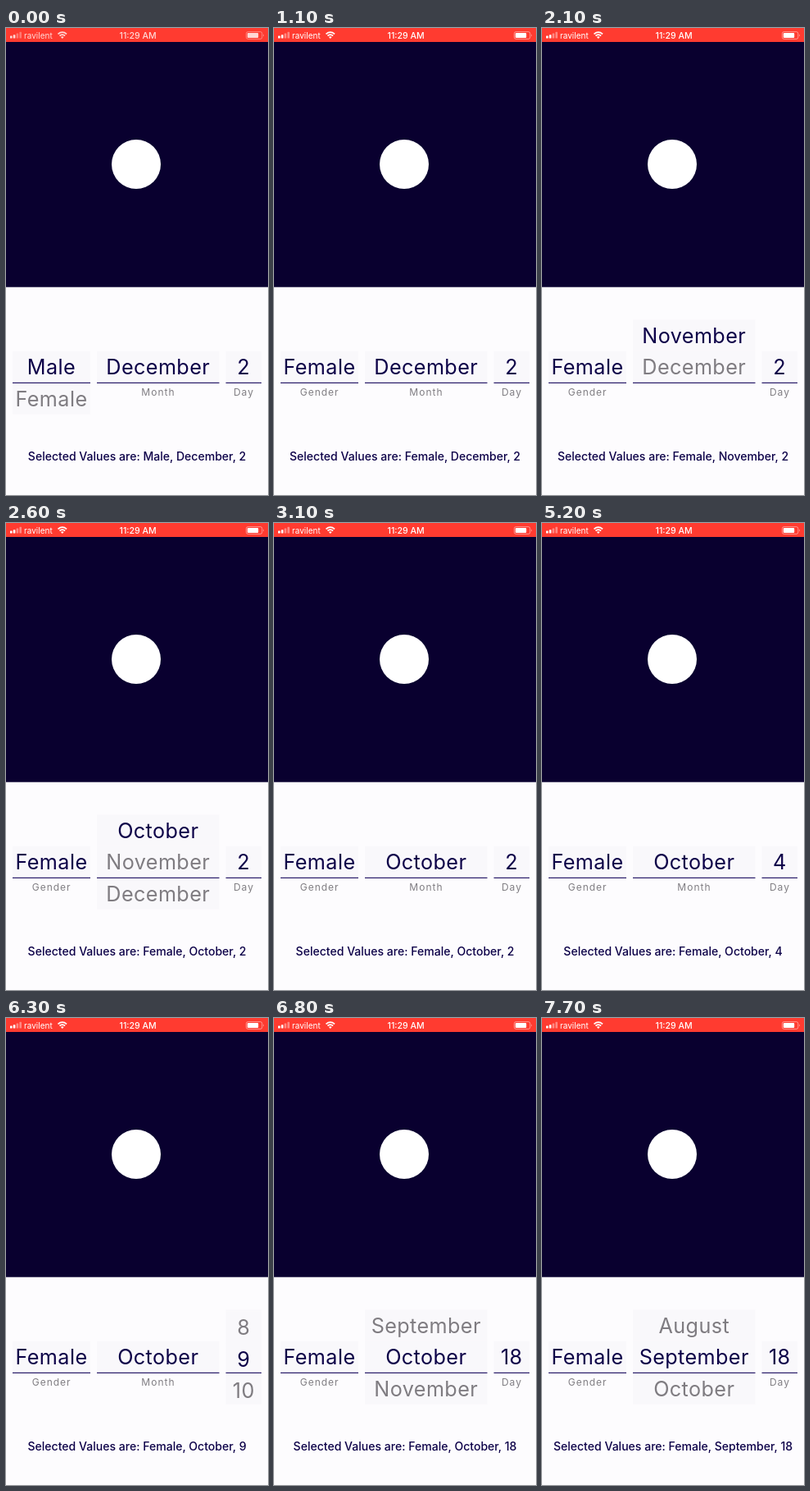
These frames come from a looping animation (320x569 px, 8 s). An HTML page:

```html
<!DOCTYPE html>
<html lang="en">
<head>
<meta charset="utf-8">
<title>Picker fields</title>
<style>
  html, body { margin: 0; width: 100%; height: 100%; overflow: hidden; background: #fdfcfe; }
  svg { display: block; width: 320px; height: 569px; font-family: Inter, "Open Sans", sans-serif; }
  text { text-anchor: middle; }
  .item { font-size: 25.2px; letter-spacing: .4px; fill: #7f7c81; }
  .item.on { fill: #0c0048; }
  .label { font-size: 12px; letter-spacing: 1px; fill: #807e83; }
  #summary { font-size: 14.06px; font-weight: 450; fill: #0c0048; }
  #status { fill: #fff; font-size: 10.6px; }
</style>
</head>
<body>
<svg viewBox="0 0 320 569">
  <defs>
    <clipPath id="open"><rect y="355.5" width="320" height="115"/></clipPath>
    <clipPath id="closed"><rect y="393.5" width="320" height="39"/></clipPath>
  </defs>
  <rect width="320" height="569" fill="#fdfcfe"/>
  <rect y="17" width="320" height="298.7" fill="#09002f"/>
  <circle cx="159" cy="166" r="30" fill="#fff"/>
  <rect width="320" height="17" fill="#ff3b30"/>
  <g id="status">
    <rect x="5" y="9.5" width="2.6" height="3" rx=".6"/>
    <rect x="8.8" y="8.2" width="2.6" height="4.3" rx=".6"/>
    <g opacity=".4">
      <rect x="12.6" y="6.6" width="2.6" height="5.9" rx=".6"/>
      <rect x="16.4" y="4.8" width="2.6" height="7.7" rx=".6"/>
    </g>
    <text x="22" y="12.5" style="text-anchor:start;font-size:10px">ravilent</text>
    <path d="M63.5 7.4q5.3-4.4 10.6 0M65.5 9.5q3.3-2.7 6.6 0" fill="none" stroke="#fff" stroke-width="1.7"/>
    <path d="M66.9 10.9q1.9-1.5 3.8 0l-1.9 2z"/>
    <text x="161.2" y="12.6" font-weight="500">11:29 AM</text>
    <rect x="293.4" y="4.6" width="19.4" height="8.8" rx="2.2" fill="none" stroke="#fff" stroke-opacity=".5" stroke-width=".9"/>
    <rect x="294.8" y="6" width="13.4" height="6" rx="1"/>
    <path d="M314 7.4q1.6 1.6 0 3.2z" opacity=".6"/>
  </g>
  <g id="fields"></g>
  <text id="summary" x="160" y="527"></text>
</svg>
<script>
const LOOP = 8000, STEP = 100, ROW = 38.6, TOP = 393.6;
const months = "January February March April May June July August September October November December".split(" ");
const days = Array.from({ length: 31 }, (_, i) => i + 1);

// open: [from, to] times; moves: [start, duration, target index]
// eager fields mark the new value as soon as a move begins
const fields = [
  { label: "Gender", x: 8, w: 95, items: ["Male", "Female"], start: 0, eager: true,
    open: [[0, 1100]], moves: [[500, 300, 1]] },
  { label: "Month", x: 111, w: 149.5, items: months, start: 11, eager: true,
    open: [[1600, 3100], [6800, LOOP]],
    moves: [[2100, 300, 10], [2600, 300, 9], [7400, 300, 8]] },
  { label: "Day", x: 268.5, w: 43.5, items: days, start: 1,
    open: [[3600, 5200], [5700, 6700]],
    moves: [[4100, 300, 2], [4600, 300, 3], [6100, 500, 17]] },
];

const $ = id => document.getElementById(id);
const ease = p => p * p * (3 - 2 * p);

function stateAt(field, t) {
  let pos = field.start, target = pos;
  for (const [begin, length, to] of field.moves) {
    if (t < begin) break;
    pos += (to - pos) * ease(Math.min(1, (t - begin) / length));
    target = to;
  }
  return {
    pos,
    chosen: field.eager ? target : Math.round(pos),
    open: field.open.some(([a, b]) => t >= a && t < b),
  };
}

function drawField({ label, x, w, items }, { pos, chosen, open }) {
  const mid = x + w / 2;
  const rows = items.map((item, i) => {
    const y = TOP + (i - pos) * ROW;
    if (Math.abs(i - pos) >= 2) return "";
    return `<rect x="${x}" y="${y}" width="${w}" height="${ROW + .2}" fill="#f9f8fb"/>
      <text class="item${i === chosen ? " on" : ""}" x="${mid}" y="${y + 28.5}">${item}</text>`;
  }).join("");
  return `<g clip-path="url(#${open ? "open" : "closed"})">${rows}</g>
    <rect x="${x}" y="431.8" width="${w}" height="1.2" fill="#281a68"/>` +
    (open ? "" : `<text class="label" x="${mid + .2}" y="448">${label}</text>`);
}

function draw(t) {
  const states = fields.map(f => stateAt(f, t));
  $("fields").innerHTML = fields.map((f, i) => drawField(f, states[i])).join("");
  $("summary").textContent = "Selected Values are: " +
    fields.map((f, i) => f.items[states[i].chosen]).join(", ");
  $("status").setAttribute("opacity", t < 100 ? .8 : 1);
}

const origin = performance.now();
let shown = -1;
function tick() {
  const t = Math.floor((performance.now() - origin) % LOOP / STEP) * STEP;
  if (t !== shown) draw(shown = t);
  requestAnimationFrame(tick);
}
tick();
</script>
</body>
</html>
```
